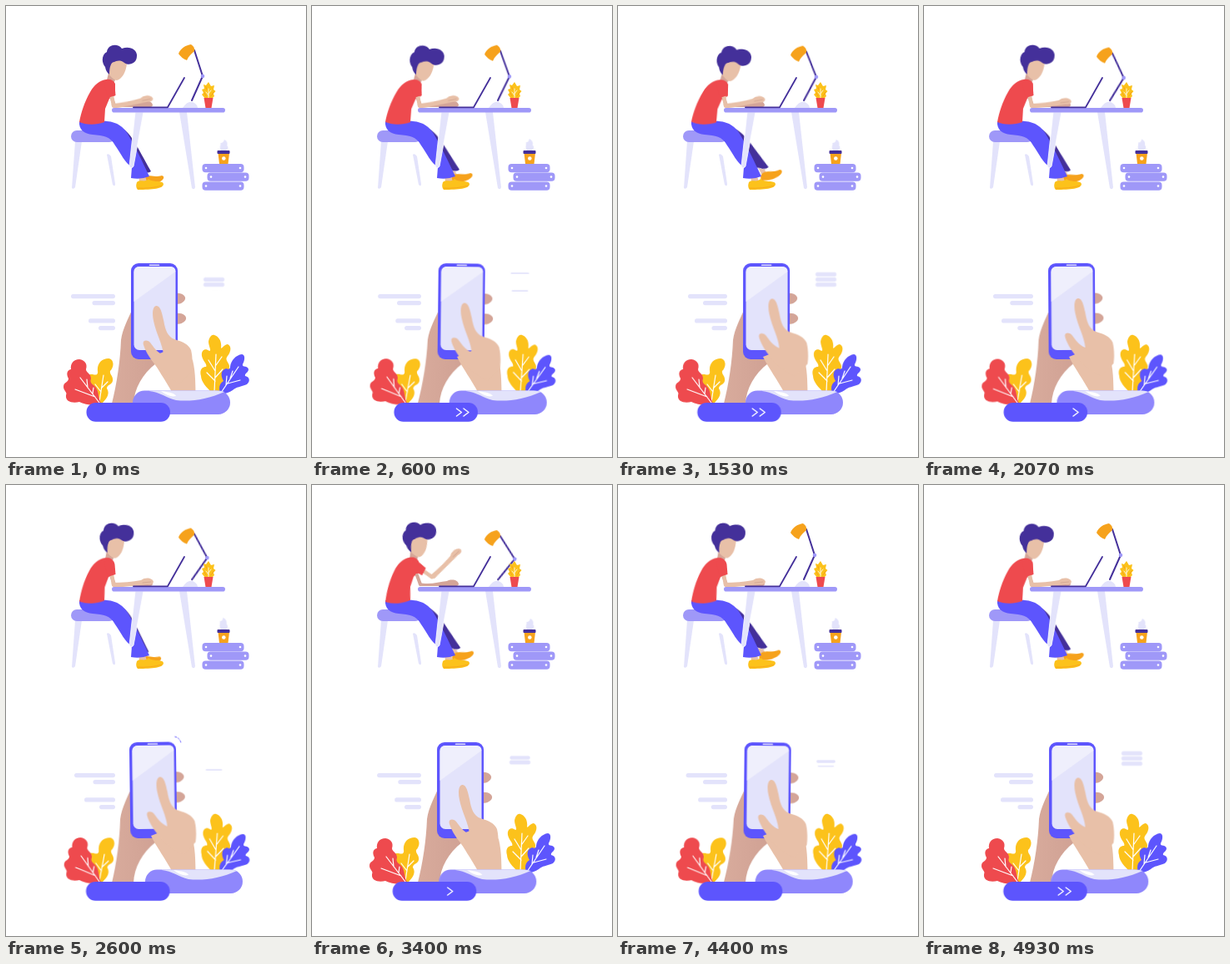
An HTML page without scripts for the animation above (5000 ms loop, 360 px wide and 540 px high).

```html
<!DOCTYPE html>
<html lang="en">
<head>
<meta charset="utf-8">
<title>Work and phone</title>
<style>
html, body { margin: 0; width: 100%; height: 100%; overflow: hidden; background: #fff; }
svg { display: block; width: 100vw; height: 100vh; }
svg * { transform-box: view-box; }
.a { animation: 5s linear infinite; }
.sway { animation: .83333s cubic-bezier(.37, 0, .63, 1) infinite alternate; }

.red { fill: #ee4a4e; } .yellow { fill: #fcc21b; } .orange { fill: #f6a21c; }
.dark { fill: #44309a; } .blue { fill: #5d55fd; } .violet { fill: #9f98f8; }
.pale { fill: #e3e3fb; } .skin { fill: #e8c0a8; } .tan { fill: #d4a598; }
.line { fill: none; stroke-linecap: round; stroke-linejoin: round; }
.vein { stroke: #fff; stroke-width: 1.2; }

/* desk scene */
.torso { transform-origin: 102px 138px; animation-name: torso; }
@keyframes torso {
  0%, 100% { transform: none; } 12% { transform: rotate(.8deg); }
  30.6% { transform: rotate(1.5deg); } 52% { transform: rotate(-2deg); }
  68% { transform: rotate(-4deg); } 77.4% { transform: rotate(-3.6deg); }
  98.6% { transform: rotate(-.6deg); }
}
.head { transform-origin: 122px 92px; animation-name: head; }
@keyframes head {
  0%, 100% { transform: none; } 12% { transform: rotate(1deg); }
  30.6% { transform: rotate(1.6deg); } 52% { transform: rotate(-1.6deg); }
  68% { transform: rotate(-4deg); } 77.4% { transform: rotate(-3.5deg); }
  98.6% { transform: rotate(-.8deg); }
}
.upper { transform-origin: 125px 97px; animation-name: upper; }
@keyframes upper {
  0%, 56%, 84%, 100% { transform: none; }
  64%, 70% { transform: rotate(-45deg); }
  75%, 77.4% { transform: rotate(-10deg); }
}
.fore { transform-origin: 129px 119px; animation-name: fore; }
@keyframes fore {
  0%, 12%, 100% { transform: rotate(-6deg); } 30.6% { transform: rotate(-5deg); }
  48%, 56%, 84%, 98.6% { transform: none; }
  64%, 70% { transform: rotate(6deg); }
  75%, 77.4% { transform: rotate(2deg); }
}
.shin { transform-origin: 140px 148px; animation-name: shin; }
@keyframes shin {
  0%, 100% { transform: none; } 12% { transform: rotate(-3.5deg); }
  30.6% { transform: rotate(-8deg); } 52% { transform: rotate(3deg); }
  68% { transform: rotate(-5deg); } 77.4% { transform: rotate(-10deg); }
  98.6% { transform: rotate(-2.6deg); }
}
.jump { animation-name: jump; }
@keyframes jump {
  0%, 74.5%, 80.5%, 100% { transform: none; } 77.4% { transform: translateY(-3.5px); }
}
.bend { animation-name: bend; transform-origin: var(--o); }
.bend.low { --o: 222px 114px; --r: 15deg; }
.bend.top { --o: 236px 84px; --r: -29.5deg; }
.bend.shade { --o: 226px 53px; --r: 14.5deg; }
@keyframes bend {
  0%, 75.5%, 100% { transform: none; }
  12% { transform: rotate(calc(var(--r) * .12)); }
  30.6% { transform: rotate(calc(var(--r) * .25)); }
  52% { transform: rotate(calc(var(--r) * .73)); }
  68%, 71% { transform: rotate(var(--r)); }
}
.steam { transform-origin: 261px 173px; animation-name: steam; }
@keyframes steam {
  from { transform: skewX(-3deg); } to { transform: skewX(3deg) scaleY(1.1); }
}

/* phone scene: a 3.333 s cycle that restarts with the 5 s loop */
.hold { transform-origin: 160px 474px; animation: hold 5s ease-in-out infinite; }
@keyframes hold {
  0%, 33.33%, 66.67%, 100% { transform: none; }
  16.67%, 83.33% { transform: rotate(.75deg); }
  50% { transform: rotate(-.75deg); }
}
.thumb { animation-name: thumb; }
@keyframes thumb {
  0%, 66.67%, 68.5% { transform: none; }
  11.5%, 78.1% { transform: translate(2.5px, -3.3px); }
  30.6%, 97.3%, 100% { transform: translate(4.5px, -8.5px); }
  52% { transform: translate(4.5px, -9.5px); }
}
.near { animation-name: near; }
@keyframes near {
  0%, 66.67% { transform: none; } 11.5%, 78.1% { transform: translateX(2px); }
  30.6%, 97.3%, 100% { transform: translateX(-1.3px); }
  52% { transform: translateX(-.5px); }
}
.far { animation-name: far; }
@keyframes far { to { transform: translateX(15.5px); } }
.leaf { transform-origin: var(--o); animation-name: leaf; }
@keyframes leaf { to { transform: rotate(2deg); } }

.bar { animation-name: bar; }
@keyframes bar {
  0%, 66.67% { x: var(--a); width: calc(131px - var(--a)); }
  11.5%, 78.1% { x: var(--b); width: calc(131px - var(--b)); }
  30.6%, 97.3%, 100% { x: var(--c); width: calc(131px - var(--c)); }
  52% { x: var(--d); width: calc(131px - var(--d)); }
}
.row { transform-origin: 0 0; }
.r1 { animation-name: r1; } .r2 { animation-name: r2; } .r3 { animation-name: r3; }
@keyframes r1 {
  0%, 66.67% { transform: translateY(327.5px); }
  9%, 75.7% { transform: translateY(320px) scale(.8, 0); }
  11.2%, 51.2%, 77.9% { transform: translateY(341px) scale(.7, 0); }
  12%, 52%, 78.7% { transform: translateY(341px) scale(.8, .35); }
  30.6%, 97.3%, 100% { transform: translateY(321.3px); }
  36% { transform: translateY(320px) scale(.8, 0); }
}
@keyframes r2 {
  0%, 66.67% { transform: translateY(333.6px); }
  10.7%, 77.4% { transform: translateY(321.4px); }
  11.8%, 78.5% { transform: translateY(320px) scale(.8, 0); }
  17%, 57%, 83.7% { transform: translateY(341px) scale(.7, 0); }
  30.6%, 97.3%, 100% { transform: translateY(327.4px); }
  38.6% { transform: translateY(320px) scale(.8, 0); }
}
@keyframes r3 {
  0%, 66.67%, 68% { transform: translateY(341px) scale(.7, 0); }
  10.7%, 77.4% { transform: translateY(326.8px); }
  12%, 78.7% { transform: translateY(320px) scale(.9, .4); }
  12.5%, 79.2% { transform: translateY(320px) scale(.8, 0); }
  22%, 88.7% { transform: translateY(341px) scale(.7, 0); }
  30.6%, 97.3%, 100% { transform: translateY(333.6px); }
  41.2% { transform: translateY(320px) scale(.8, 0); }
}
.chev path { animation: 5s step-end infinite; opacity: 0; }
.chev .c1 { animation-name: c1; } .chev .c2 { animation-name: c2; } .chev .c3 { animation-name: c3; }
@keyframes c1 {
  0%, 11.4%, 37.4%, 78% { opacity: 0; } .8%, 26.8%, 67.5%, 93.4%, 100% { opacity: 1; }
}
@keyframes c2 {
  0%, 14%, 40%, 80.6% { opacity: 0; } 3.4%, 29.4%, 70%, 96%, 100% { opacity: 1; }
}
@keyframes c3 {
  0%, 16.6%, 42.6%, 83.3% { opacity: 0; } 6.6%, 32.6%, 73.3%, 99.3%, 100% { opacity: 1; }
}
.ping { opacity: 0; animation: ping 5s step-end infinite; }
@keyframes ping { 0%, 53% { opacity: 0; } 51.4% { opacity: 1; } }
</style>
</head>
<body>
<svg viewBox="0 0 360 540">
  <defs>
    <g id="book">
      <rect class="violet" width="50" height="10.2" rx="4"/>
      <circle cx="4.5" cy="5" r="1.3" fill="#fff"/><circle cx="45.5" cy="5" r="1.3" fill="#fff"/>
    </g>
    <linearGradient id="arm" x1="0" y1="0" x2="1" y2="0">
      <stop offset="0" stop-color="#d8ab9c"/><stop offset="1" stop-color="#cfa093"/>
    </linearGradient>
  </defs>

  <!-- desk -->
  <path class="pale" d="M83 162H91L83 217Q81 220 79 218ZM121 178Q123 176 126 180L131 213Q131 217 128 214Z"/>
  <rect class="violet" x="78" y="149" width="53" height="14" rx="7"/>

  <g class="a shin">
    <path class="dark" d="M136 145C149 149 157 168 174 198Q170 201 164 198L154 195Z"/>
    <path class="skin" d="M162 198L169 200L171 207H165Z"/>
    <path class="orange" d="M165 205C171 201 177 206 187 203Q191 204 188 208C181 214 172 214 163 213Q162 208 165 205Z"/>
  </g>
  <path class="skin" d="M159 204H167L169 210H160Z"/>
  <path class="yellow" d="M157 211C162 207 166 212 171 207C176 212 188 208 189 213C189 219 176 220 158 220Q155 217 157 211Z"/>
  <path class="line" stroke="#f6a21c" stroke-width=".8" d="M158 218Q174 219 187 215"/>
  <path class="blue" d="M88 138C100 142 111 137 121 138C134 139 141 145 146 153C155 168 164 187 172 204Q162 208 150 206L151 193C143 188 138 177 131 167C125 156 117 155 104 154C94 153 87 148 88 138Z"/>
  <path class="pale" stroke="#fff" stroke-width=".8" d="M155 127H165L153 192Q150 196 148 192Z"/>
  <path class="pale" d="M208 127H217L227 217Q226 221 223 218Z"/>

  <g class="a torso">
    <g class="a head">
      <path class="tan" d="M124 76L133 84L129 93H120Z"/>
      <path class="skin" d="M124 67C129 60 141 62 145 69C144 79 139 88 133 89C127 88 125 82 123 82Z"/>
      <path class="dark" d="M119 73C114 67 115 58 121 55C122 46 134 44 139 51C149 47 158 53 157 60C157 69 147 72 142 68C137 64 132 66 130 67C126 67 124 73 124 82Q120 79 119 73Z"/>
    </g>
    <path class="red" d="M88 139C90 128 94 115 101 103C106 94 113 89 120 88Q128 87 131 93L131 107L124 111L119 123L118 139C107 143 95 142 88 139Z"/>
  </g>

  <path class="line" stroke="#d4a598" stroke-width="4" d="M126 108L130 119"/>
  <path class="tan" d="M128 117C142 120 152 116 162 115C168 112 176 114 176 119Q175 122 168 121H132Q127 121 128 117Z"/>
  <g class="a upper">
    <g class="a fore">
      <path class="skin" d="M127 117C140 117 152 116 162 114C167 110 176 111 177 116Q176 120 170 119C158 120 142 122 131 123Q126 122 127 117Z"/>
      <path class="line" stroke="#c89b88" stroke-width=".6" d="M164 117L174 116"/>
    </g>
    <path class="line" stroke="#e8c0a8" stroke-width="4.5" d="M126 102L129 119"/>
    <path class="red" d="M118 93C122 87 130 90 130.500 95L131.500 107L122 110Z"/>
  </g>

  <rect class="violet" x="127" y="122" width="136" height="5.6" rx="2.8"/>
  <path class="line" stroke="#44309a" stroke-width="1.8" d="M153 121.3H194L214 86"/>

  <g class="a jump">
    <path class="pale" d="M212 122Q218 113 224 115Q230 118 230 122Z"/>
    <g class="a bend low">
      <path class="line" stroke="#44309a" stroke-width="2" d="M223 113L236 84"/>
      <g class="a bend top">
        <path class="line" stroke="#44309a" stroke-width="2" d="M236 84L226 53"/>
        <g class="a bend shade">
          <path class="orange" d="M222 46Q227 49 226 54C223 57 219 60 217 65Q210 62 207 57C210 50 216 47 222 46Z"/>
        </g>
      </g>
      <circle cx="236" cy="84" r="2.3" class="violet"/>
    </g>
    <path class="yellow" d="M239 111L235 106L237 104L235 100L238 99L237 94L240 95L243 91L246 96L250 95L249 100L251.500 102L249 105L250 108L247 111Z"/>
    <path class="line" stroke="#f6a21c" stroke-width="1" d="M240 108L238 104M246 108L249 103M241 100L240 97"/>
    <path class="line" stroke="#fff" stroke-width=".8" d="M243 110V99M243 107L240 103M243 105L246 101"/>
    <path class="red" d="M237.500 110H248.500L246.500 122H239.500Z"/>
  </g>

  <path class="sway steam pale" d="M258 173C255 168 258 167 257 164C260 164 261 162 261 160C264 161 266 164 265 167Q268 170 264 173Z"/>
  <path class="orange" d="M254.500 176H268L266.500 189H256Z"/>
  <rect class="dark" x="253.500" y="173" width="15" height="4" rx="1"/>
  <circle cx="261.300" cy="182.500" r="2.300" fill="#fff"/>
  <use href="#book" x="235.500" y="189"/>
  <use href="#book" x="241.500" y="199.600"/>
  <use href="#book" x="235.500" y="210.500"/>

  <!-- drifting bars -->
  <g class="pale">
    <rect class="a bar" style="--a:78px;--b:79px;--c:84px;--d:82px" y="345" height="5.2" rx="2.6"/>
    <rect class="a bar" style="--a:103.500px;--b:102px;--c:102px;--d:104.500px" y="353" height="5.2" rx="2.6"/>
    <rect class="a bar" style="--a:99px;--b:100.500px;--c:92px;--d:94px" y="374.300" height="5.2" rx="2.6"/>
    <rect class="a bar" style="--a:111px;--b:111px;--c:112.500px;--d:112px" y="383" height="5.2" rx="2.6"/>
    <g transform="translate(249.5)">
      <rect class="a row r1" x="-12.500" y="-2.500" width="25" height="5" rx="2"/>
      <rect class="a row r2" x="-12.500" y="-2.500" width="25" height="5" rx="2"/>
      <rect class="a row r3" x="-12.500" y="-2.500" width="25" height="5" rx="2"/>
    </g>
  </g>

  <!-- plants -->
  <g class="sway leaf" style="--o:113px 475px">
    <path class="yellow" d="M110 475C104 468 98 460 101 453C95 447 97 440 104 441Q111 443 110 437C109 428 115 422 123 422C130 423 130 432 125 437C124 441 129 443 128 449C127 454 121 453 121 458C125 464 121 470 116 475Z"/>
    <path class="line vein" d="M112 474L117 442M114 462L107 453M115 457L122 450"/>
  </g>
  <g class="sway leaf" style="--o:115px 477px">
    <path class="red" d="M115 477C104 479 94 477 88 474C80 476 71 474 72 466C74 462 69 461 69 456C69 450 75 451 75 446C72 441 73 436 78 435C77 428 81 423 88 423C95 424 98 429 96 435C96 439 102 440 102 446C100 452 104 452 108 457C112 463 110 470 115 477Z"/>
    <path class="line vein" d="M112 475L89 445M107 468L83 459M98 457L97 447M104 464L105 457"/>
  </g>
  <g class="sway leaf" style="--o:252px 463px">
    <path class="yellow" d="M247 463C241 457 234 450 234 443C232 436 235 432 240 432C242 429 236 425 235 419C234 412 239 409 244 413C247 413 243 407 243 402C244 396 247 393 250 394C256 396 259 402 258 409C258 412 262 405 266 405C271 407 270 414 266 419C262 424 267 426 268 431C268 441 262 455 256 463Z"/>
    <path class="line vein" d="M250 462L252 417M251 449L241 439M251 437L243 424M251 445L260 435M252 430L259 420"/>
  </g>
  <g class="sway leaf" style="--o:258px 464px">
    <path class="blue" d="M257 464C255 457 256 452 261 449C257 442 258 436 264 434Q269 436 269 432C270 424 276 418 283 417C288 418 286 425 284 429C283 433 290 430 291 435C291 439 286 440 287 443C293 444 293 450 289 453C282 456 276 456 272 460Q265 465 257 464Z"/>
    <path class="line vein" d="M258 463L279 432M264 454L265 443M269 446L272 437M266 452L281 448"/>
  </g>

  <!-- phone -->
  <g class="hold">
    <path class="tan" d="M203 344C212 343 216 348 215 351C213 356 208 357 203 357ZM203 368C212 367 217 371 216 375C214 380 208 381 203 381Z"/>
    <path fill="url(#arm)" d="M152 362C147 374 140 386 138 400C137 426 133 452 127 476H153C154 458 164 440 180 428L190 415Z"/>
    <rect class="blue" x="150" y="308" width="56" height="115" rx="9"/>
    <rect class="pale" x="153.500" y="312" width="50" height="100" rx="6.500"/>
    <path fill="#efeffc" d="M153.500 354V318.500Q153.500 312 160 312H197Q203.500 312 203.500 318Z"/>
    <path class="line" stroke="#e3e3fb" stroke-width="1.6" d="M172.500 310.300H183.500"/>
    <path class="ping line" stroke="#5d55fd" stroke-width="1" stroke-dasharray="2 2" d="M205 302Q210 303 212 309"/>
  </g>
  <g class="skin">
    <path d="M174 420C181 434 191 447 200 464V478H228C227 455 228 440 224 424L205 408Z"/>
    <path class="a thumb" d="M180 359C185 358 187 367 189 376C191 388 194 396 202 399C212 402 219 405 222 412C224 420 224 430 223 437L208 452C198 446 188 440 182 433C174 424 168 415 165 406C163 400 169 399 173 403C177 408 181 415 189 418C188 405 180 392 177 377C175 368 176 360 180 359Z"/>
  </g>

  <g class="sway far">
    <rect x="152" y="460.500" width="117" height="28.500" rx="14.200" fill="#8f87fc"/>
    <path class="pale" d="M172 461C184 462 192 469 204 472C222 474 242 471 262 462Q258 460 250 460.500H172Z"/>
    <path fill="#fff" d="M186 461Q203 463 204 467Q196 469 186 461Z"/>
  </g>
  <g class="a near">
    <rect class="blue" x="96.500" y="475" width="100.500" height="22.800" rx="11.200"/>
    <g class="chev line" stroke="#fff" stroke-width="1.4">
      <path class="c1" d="M162.500 482L168.500 486.500L162.500 491"/>
      <path class="c2" d="M171.500 482L177.500 486.500L171.500 491"/>
      <path class="c3" d="M180 482L186 486.500L180 491"/>
    </g>
  </g>
</svg>
</body>
</html>
```
